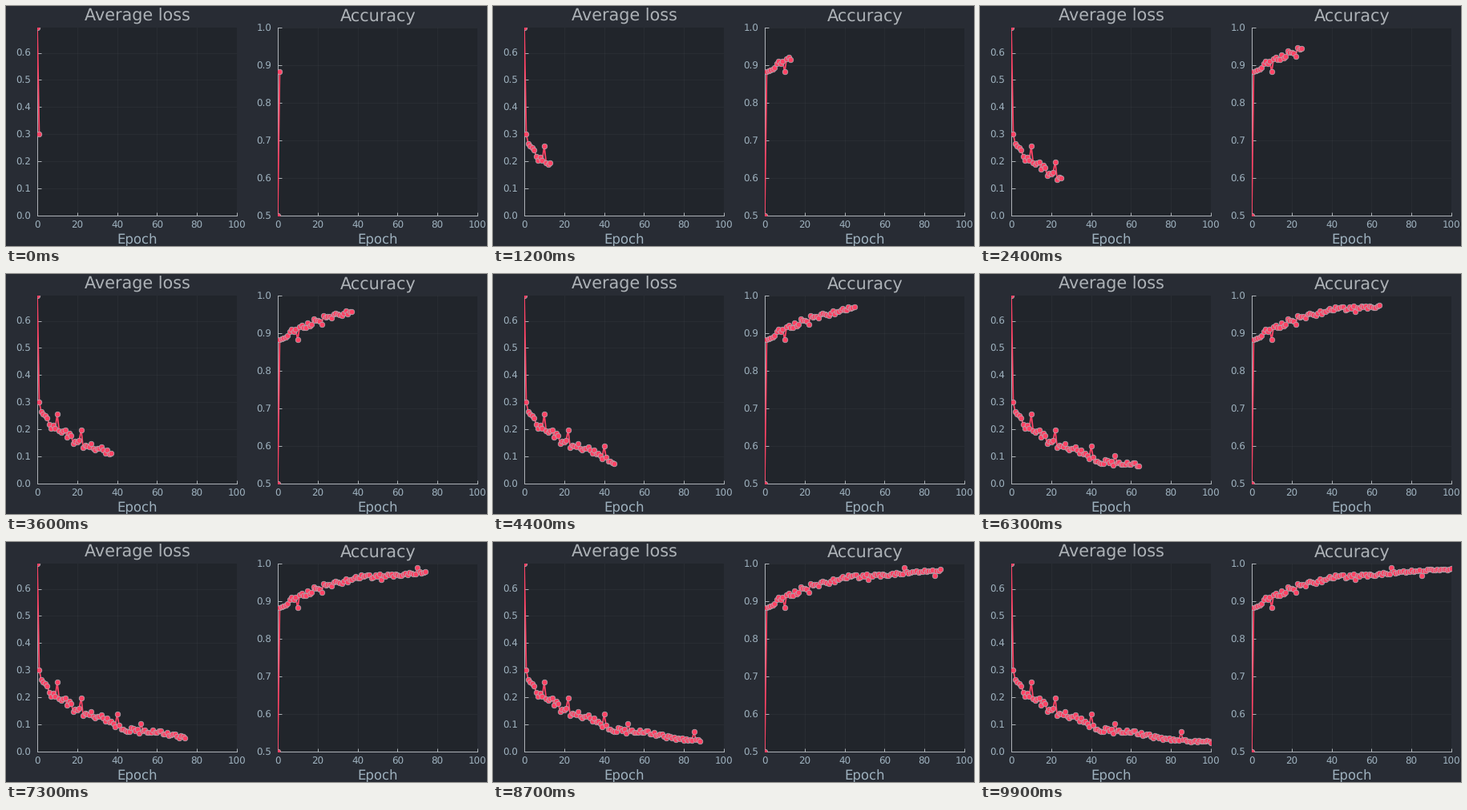
These frames come from a looping animation (600 by 300 pixels, 10000 ms). A matplotlib script:

```python
import numpy as np
import matplotlib.pyplot as plt
from matplotlib.animation import FuncAnimation

W, H, DPI = 600, 300, 100
EPOCHS = 100
BG, PANEL = "#282c34", "#21252b"
FG, LABEL, RED = "#adb2b7", "#9eb1be", "#fe4365"

plt.rcParams.update({"font.family": "DejaVu Sans", "text.hinting": "none"})


def px(size):
    return size * 72 / DPI


def curve(trend, noise, spikes):
    """Piecewise trend plus fading noise and a few marked epochs."""
    n = np.arange(EPOCHS + 1)
    jitter = noise * np.clip((n - 5) / 4, 0, 1) * np.exp(-n / 60)
    values = np.interp(n, *zip(*trend)) + jitter
    for epoch, value in spikes.items():
        values[epoch] = value
    return values


wobble = np.random.default_rng(4).uniform(-1, 1, EPOCHS + 1)
loss = curve([(0, 0.693), (1, 0.3), (2, 0.265), (5, 0.243), (6, 0.214),
              (12, 0.19), (20, 0.148), (32, 0.125), (44, 0.081),
              (62, 0.069), (80, 0.045), (100, 0.037)],
             0.022 * wobble, {10: 0.256, 22: 0.199, 40: 0.138, 52: 0.104, 85: 0.073})
accuracy = curve([(0, 0.5), (1, 0.882), (5, 0.893), (6, 0.905), (20, 0.938),
                  (42, 0.966), (60, 0.971), (80, 0.98), (100, 0.986)],
                 -0.012 * wobble, {10: 0.882, 22: 0.923, 52: 0.957, 70: 0.99, 85: 0.969})

fig = plt.figure(figsize=(W / DPI, H / DPI), dpi=DPI, facecolor=BG)


def note(x, y, text, size, color=LABEL, ha="center"):
    fig.text(x / W, 1 - y / H, text, fontsize=px(size), color=color,
             ha=ha, va="baseline")


def panel(left, title, values, low, high, ticks):
    x0, x1, y0, y1 = left, left + 249, 262, 27
    ax = fig.add_axes([x0 / W, 1 - y0 / H, (x1 - x0) / W, (y0 - y1) / H],
                      facecolor=PANEL)
    ax.set(xlim=(0, EPOCHS), ylim=(low, high),
           xticks=range(0, EPOCHS + 1, 20), yticks=ticks)
    ax.set_axisbelow(True)
    ax.grid(color=FG, alpha=0.05, lw=px(1))
    ax.tick_params(direction="in", length=px(4.5), width=px(1), color=FG,
                   labelbottom=False, labelleft=False)
    for side, spine in ax.spines.items():
        spine.set(visible=side in ("left", "bottom"), color=FG, linewidth=px(1))

    for t in range(0, EPOCHS + 1, 20):
        note(x0 + 2.49 * t, 277.5, str(t), 11.9)
    for t in ticks:
        y = y0 - (t - low) / (high - low) * (y0 - y1)
        note(x0 - 7.5, y + 4.5, f"{t:.1f}", 11.9, ha="right")
    mid = (x0 + x1) / 2 + 0.5
    note(mid, 18.3, title, 20.8, FG)
    note(mid, 297.6, "Epoch", 16.5)

    line, = ax.plot([], [], color=RED, lw=px(1.8), zorder=2.6)
    dots, = ax.plot([], [], "o", ms=px(6.6), mfc=RED, mec=FG, mew=px(0.7), zorder=3)
    return line, dots, values


panels = [
    panel(39, "Average loss", loss, 0, loss[0], np.arange(7) / 10),
    panel(338.9, "Accuracy", accuracy, 0.5, 1, np.arange(5, 11) / 10),
]


def draw(k):
    n = k + 2
    artists = []
    for line, dots, values in panels:
        for artist in (line, dots):
            artist.set_data(np.arange(n), values[:n])
            artists.append(artist)
    return artists


anim = FuncAnimation(fig, draw, frames=EPOCHS, init_func=lambda: draw(0),
                     interval=100, repeat=True, repeat_delay=0)
plt.show()
```
